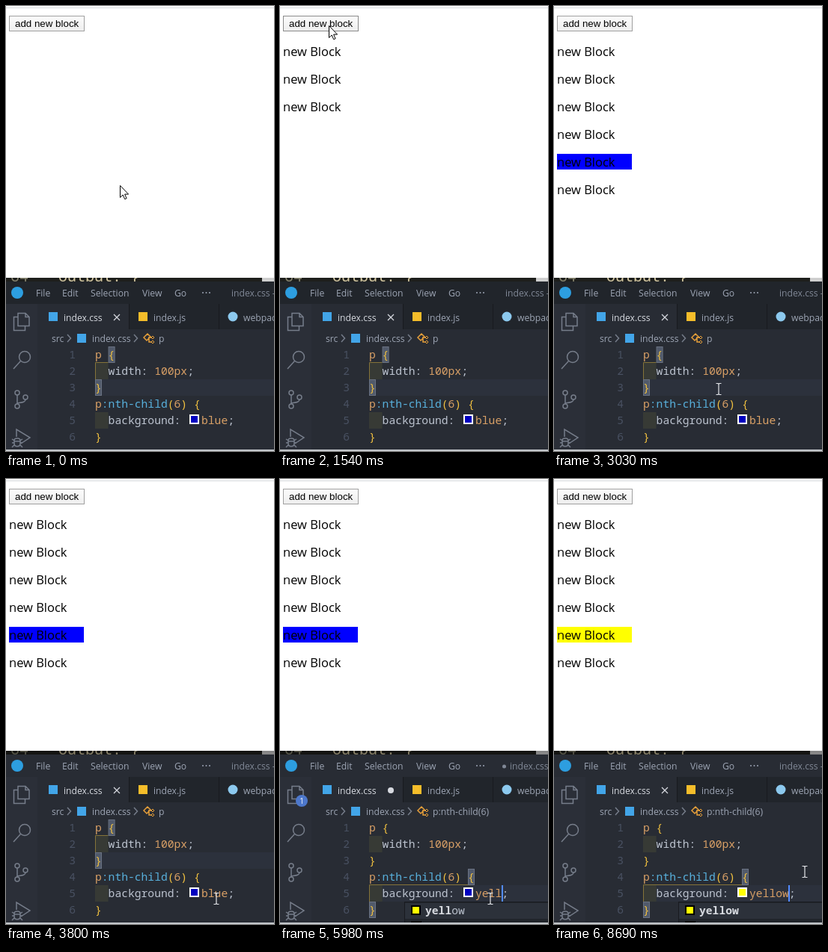
Animation, 358 px wide and 596 px high, one loop 8770 ms. Source, as an HTML page:

```html
<!DOCTYPE html>
<html lang="en">
<head>
<meta charset="utf-8">
<title>Live CSS edit</title>
<style>
  html, body { margin: 0; width: 100%; height: 100%; overflow: hidden; background: #fff; }
  svg { display: block; }
  text { white-space: pre; }
  .ui { font: 12.2px "Open Sans", "Noto Sans", sans-serif; fill: #9da5b4; }
  .code { font: 14.667px "Noto Sans Mono", monospace; fill: #bcc3cf; }
  .page { font: 16.5px "Open Sans", "Noto Sans", sans-serif; fill: #000; }
  .btn { font: 13.33px "Liberation Sans", Arial, sans-serif; fill: #000; }
  .strip { font: 20px "Noto Sans Mono", monospace; fill: #d3c7a2; }
  .num { fill: #495162; text-anchor: end; }
  .gold { fill: #f0c040; }
  .orange { fill: #d9a066; }
  .cyan { fill: #58b0dc; }
  .bright { fill: #d7dae0; }
  .line { fill: none; stroke: #767d8a; stroke-width: 1.5; }
  .match { fill: #515a6b; stroke: #6a7282; }
  .scope { fill: none; stroke: #857439; }
</style>
</head>
<body>
<svg id="stage" width="358" height="596" viewBox="0 0 358 596"></svg>
<script>
const CHAR = 8.8, LEFT = 119, WORD_X = 261;
const rowTop = n => 456 + 22 * (n - 1);
const baseY = n => rowTop(n) + 16;
const col = n => LEFT + n * CHAR;

const rect = (x, y, w, h, fill, extra = '') =>
  `<rect x="${x}" y="${y}" width="${w}" height="${h}" fill="${fill}" ${extra}/>`;
const text = (x, y, cls, str, extra = '') =>
  `<text x="${x}" y="${y}" class="${cls}" ${extra}>${str}</text>`;
const span = (cls, str) => `<tspan class="${cls}">${str}</tspan>`;
const group = (id, body) => `<g id="${id}">${body}</g>`;
const code = (n, c, str) => text(col(c), baseY(n), 'code', str);
const brace = (n, c) =>
  `<rect class="match" x="${col(c) + .5}" y="${rowTop(n) + .5}" width="8" height="21"/>`;
const scope = (n, c) =>
  `<path class="scope" d="M${col(c)} ${rowTop(n) + 21.5}H${LEFT + .5}v22.5"/>`;
const chevron = x => `<path class="line" d="M${x} 440l4.5 5-4.5 5"/>`;

const page = rect(0, 0, 358, 364, '#fff') + rect(0, 2, 358, 1, '#d6d9dc') +
  `<rect id="button" x="4.5" y="13.5" width="100" height="20"/>` +
  text(12, 28, 'btn', 'add new block') +
  [0, 1, 2, 3, 4, 5].map(i => group('block' + i,
    (i === 4 ? `<rect id="fill" x="4" y="198" width="100" height="21"/>` : '') +
    text(4, 67 + 37 * i, 'page', 'new Block'))).join('');

const strip = rect(0, 364, 358, 6, '#1e1f1c') +
  `<g clip-path="url(#slit)">` +
  text(6, 369, 'strip', '64', 'style="fill:#85836f"') +
  text(70, 369, 'strip', 'output: }') + '</g>' +
  rect(342, 364, 16, 5, '#cfcfcf') +
  rect(0, 364, 358, 6, '#000', 'id="shade" opacity=".35"');

const menu = [[40, 'File'], [75, 'Edit'], [113, 'Selection'], [182, 'View'], [225, 'Go']]
  .map(([x, s]) => text(x, 389, 'ui', s)).join('') +
  [263, 267.5, 272].map(x => `<circle cx="${x}" cy="384" r="1" fill="#9da5b4"/>`).join('');

const header = rect(0, 369, 358, 30, '#21252b', 'id="titlebar"') +
  `<circle cx="15" cy="384" r="8" fill="#2d9ee0"/>` + menu +
  text(301, 389, 'ui', 'index.css -', 'id="title" style="fill:#808896"') +
  `<circle id="titleDot" cx="299.500" cy="385" r="2.500" fill="#808896"/>`;

const tabs = rect(42, 399, 316, 34, '#21252b') + rect(42, 399, 122, 34, '#282c34') +
  rect(164, 399, 1, 34, '#181a1f') + rect(284, 399, 1, 34, '#181a1f') +
  rect(57, 410, 12, 12, '#42a5e8') + text(77, 422, 'ui bright', 'index.css') +
  `<path id="close" fill="none" stroke="#d7dae0" stroke-width="1.2" d="M144 413l8 8m0-8l-8 8"/>` +
  `<circle id="dirty" cx="148" cy="417" r="4" fill="#d7dae0"/>` +
  rect(177, 410, 12, 12, '#f5bd2a') + text(197, 422, 'ui', 'index.js') +
  `<circle cx="303" cy="416" r="6.500" fill="#8cc9ee"/>` +
  text(317, 422, 'ui', 'webpack.config.js');

const crumbs = text(61, 450, 'ui', 'src') + chevron(82) +
  rect(95, 439, 12, 12, '#42a5e8') + text(115, 450, 'ui', 'index.css') + chevron(171) +
  `<path d="M184 444l5-5 4 4-5 5zM190 444h4m-3 0v6h3" fill="none" stroke="#e8a03a" stroke-width="1.500"/>` +
  `<path d="M194 444l2-2 2 2-2 2zM194 450l2-2 2 2-2 2z" fill="none" stroke="#e8a03a"/>` +
  text(204, 450, 'ui', 'p', 'id="crumb"');

const sidebar = rect(0, 399, 42, 197, '#2b2f38') +
  `<g class="line">
    <path d="M16 411.500h10l5 5v12H16zM26 411.500v5h5M16 416.500h-5.500v18h15v-6"/>
    <circle cx="25" cy="470" r="7.500"/><path d="M19.500 475.500L10 486"/>
    <circle cx="15" cy="518" r="3"/><circle cx="15" cy="536" r="3"/><circle cx="26" cy="524" r="3"/>
    <path d="M15 521v12M26 527c0 4-5 4-11 5"/>
    <path d="M14 577V567l18 11-12 8"/>
    <path d="M11 582c0-4 8-4 8 0v4c0 5-8 5-8 0zM11 583h8M8 580l3 2m8 0l3-2M8 585h3m8 0h3M8 591l3-3m8 0l3 3"/>
  </g>` +
  group('badge', `<circle cx="29" cy="431" r="8" fill="#4d78cc"/>` +
    text(29, 434.5, 'ui', '1', 'text-anchor="middle" style="font-size:10px;fill:#fff"'));

const editor = rect(42, 433, 316, 163, '#282c34') +
  rect(LEFT, 0, 239, 22, '#2c313c', 'id="active"') +
  [2, 5].map(n => rect(LEFT, rowTop(n), 2 * CHAR, 22, '#373a35')).join('') +
  group('outerMatch', scope(1, 2) + brace(1, 2) + brace(3, 0)) +
  group('innerScope', scope(4, 15)) +
  group('innerMatch', brace(4, 15) + brace(6, 0)) +
  `<rect id="select" class="match" x="261.500" y="544.500" width="35" height="21" style="fill:#566178;stroke:#748097"/>` +
  [1, 2, 3, 4, 5, 6].map(n => text(93, baseY(n), 'code num', n)).join('') +
  code(1, 0, span('orange', 'p ') + span('gold', '{')) +
  code(2, 2, 'width: ' + span('orange', '100px') + ';') +
  code(3, 0, span('gold', '}')) +
  code(4, 0, span('orange', 'p') + span('cyan', ':nth-child') + span('gold', '(') +
    span('orange', '6') + span('gold', ') {')) +
  code(5, 2, 'background:') +
  `<rect id="swatch" x="246" y="548" width="11" height="11" stroke="#fff" stroke-width="2"/>` +
  text(WORD_X, baseY(5), 'code', span('orange" id="word', '') + ';') +
  code(6, 0, span('gold', '}')) +
  `<rect id="caret" y="544" width="2" height="22" fill="#528bff"/>`;

const popup = group('popup',
  rect(166.5, 566.5, 200, 40, '#21252b', 'stroke="#181a1f"') +
  rect(167, 568, 191, 21, '#2c313a') +
  rect(176, 572, 11, 11, '#ff0', 'stroke="#000" stroke-width="2"') +
  rect(175, 592, 14, 2, '#000') +
  text(194, 583, 'code', span('bright" id="hit" font-weight="bold', '') + '<tspan id="rest"></tspan>'));

const pointers =
  `<path id="arrow" d="M.5 .5v16l3.700-3.500 2.500 5.700 2.400-1-2.500-5.600h5z" fill="#fff" stroke="#000"/>` +
  `<path id="ibeam" d="M-3.500-7.500h2.500l1 1 1-1h2.500M0-6.500v13M-3.500 7.500h2.500l1-1 1 1h2.500" fill="none" stroke="#e4e6ea" stroke-width="1.200"/>`;

const gradient = (id, a, b) => `<linearGradient id="${id}" x2="0" y2="1">
  <stop stop-color="${a}"/><stop offset="1" stop-color="${b}"/></linearGradient>`;

const stage = document.getElementById('stage');
stage.innerHTML = `<defs>${gradient('up', '#fcfcfc', '#eeeeee')}${gradient('down', '#d8d8d8', '#ececec')}
  <clipPath id="slit"><rect y="364" width="358" height="6"/></clipPath></defs>` +
  page + strip + header + editor + tabs + crumbs + sidebar + popup +
  rect(0, 594, 358, 2, '#c3c7cb') + pointers;

const el = {};
stage.querySelectorAll('[id]').forEach(n => el[n.id] = n);
const show = (id, on) => el[id].style.display = on ? '' : 'none';
const set = (id, attrs) => { for (const k in attrs) el[id].setAttribute(k, attrs[k]); };

// All times in ms.
const LOOP = 8770, STEP = 77;
const BLOCKS = [1150, 1310, 1540, 1780, 2010, 2240];
const PRESSES = [[1080, 1150], [1230, 1310], [1390, 1540], [1610, 1780], [1860, 2010], [2090, 2240]];
const KEYS = [5430, 5660, 5830, 5980, 6210, 6360];
const CARET = [[3880, 4410], [4960, 6840], [7370, 7830], [8380, LOOP]];

const within = (t, spans) => spans.some(([a, b]) => t >= a && t < b);
const count = (t, times) => times.filter(x => t >= x).length;
const mix = (a, b, p) => a + (b - a) * p;
const progress = (t, start, steps) =>
  Math.max(0, Math.min(1, (Math.floor((t - start) / STEP) + 1) / steps));
const easeOut = (p, power) => 1 - (1 - p) ** power;
const smooth = p => p * p * (3 - 2 * p);

function pointer(t) {
  if (t < 2700) {
    const p = smooth(progress(t, 80, 11));
    return [mix(152, 65, p), mix(240, 26, p)];
  }
  if (t < 8230) {
    const p = progress(t, 2700, 10);
    return [mix(65, 281, easeOut(p, 1.83)), mix(26, 562, easeOut(p, 3.46))];
  }
  if (t >= 8690) return [335, 526];
  const p = progress(t, 8230, 4);
  return [mix(281, 332, p), mix(562, 557, p)];
}

function draw(t) {
  const [x, y] = pointer(t).map(Math.round);
  const focused = t >= 3800, inner = t >= 3880;
  const selected = t >= 4030 && t < KEYS[0];
  const dirty = t >= 5510 && t < 7370;
  const typed = count(t, KEYS), shown = count(t, BLOCKS);
  const word = typed ? 'yellow'.slice(0, typed) : 'blue';
  const pressed = within(t, PRESSES);
  const hover = x < 105 && y > 12 && y < 34;

  set('button', { fill: `url(#${pressed ? 'down' : 'up'})`, stroke: hover ? '#8a8a8a' : '#a0a0a0' });
  for (let i = 0; i < 6; i++) show('block' + i, i < shown);
  set('fill', { fill: t >= 8000 ? '#ff0' : '#00f' });

  show('shade', focused);
  set('titlebar', { fill: focused ? '#282c34' : '#21252b' });
  el.title.textContent = dirty ? 'index.css -' : 'index.css - demo';
  set('title', { x: dirty ? 307 : 301 });
  show('titleDot', dirty);
  show('dirty', dirty);
  show('close', !dirty);
  show('badge', t >= 5660 && t < 7450);
  el.crumb.textContent = inner ? 'p:nth-child(6)' : 'p';

  set('active', { y: rowTop(inner ? 5 : 3) });
  show('active', !selected);
  show('outerMatch', !inner);
  show('innerMatch', inner && !selected);
  show('innerScope', inner);
  show('select', selected);
  set('swatch', { fill: t >= 6440 ? '#ff0' : '#0000c0' });
  el.word.textContent = word;
  set('caret', { x: Math.floor(WORD_X + word.length * CHAR) });
  show('caret', within(t, CARET));
  show('popup', t >= 5580);
  el.hit.textContent = word;
  el.rest.textContent = 'yellow'.slice(typed);

  const overCode = y > 456;
  show('arrow', !overCode);
  show('ibeam', overCode);
  set(overCode ? 'ibeam' : 'arrow', { transform: `translate(${x} ${y})` });
}

const start = performance.now();
function tick() {
  draw((performance.now() - start) % LOOP);
  requestAnimationFrame(tick);
}
tick();
</script>
</body>
</html>
```
